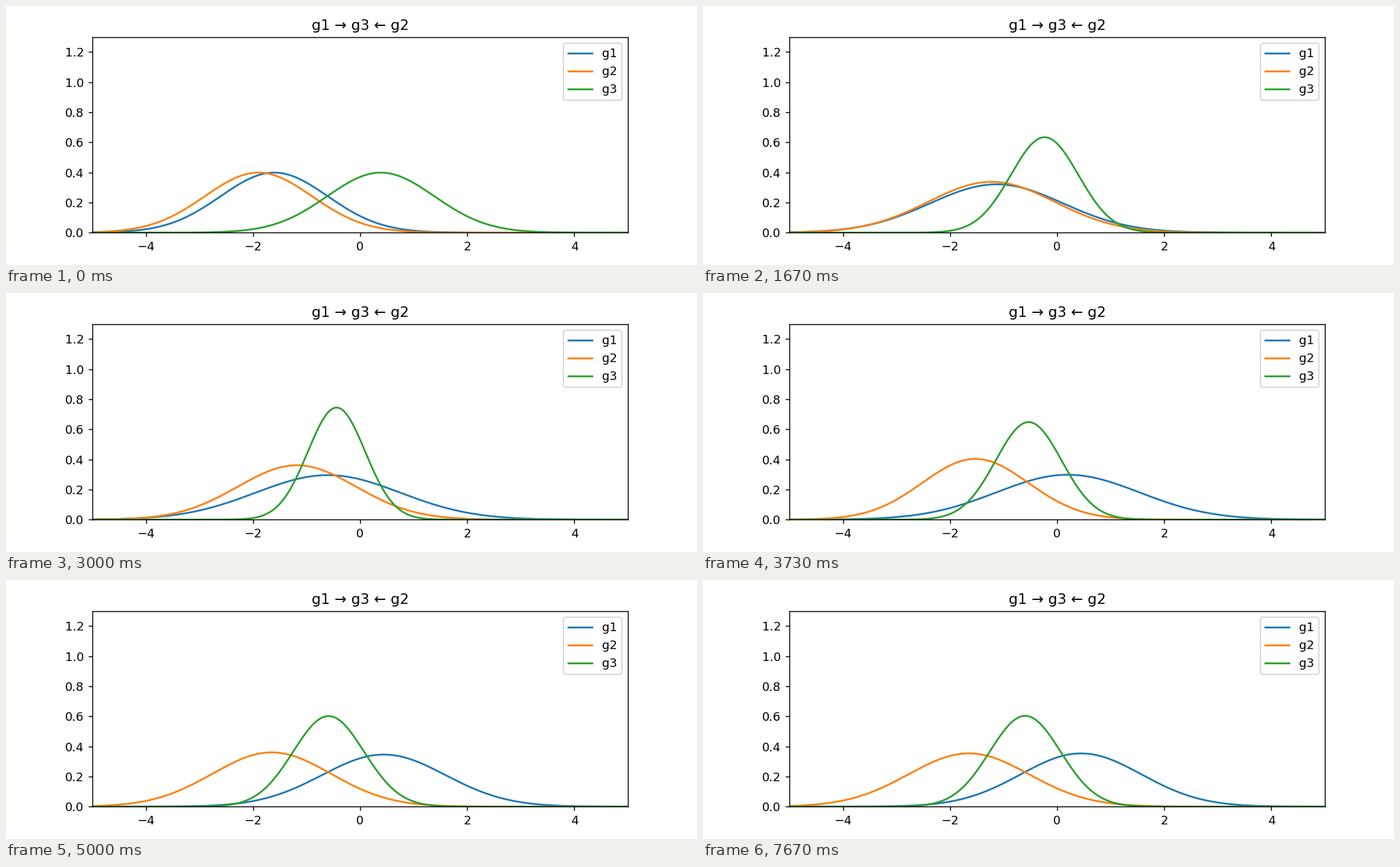
Animation, 1040 px wide and 390 px high, one loop 8 s. Source, as a matplotlib script:

```python
import numpy as np
import matplotlib.pyplot as plt
from matplotlib.animation import FuncAnimation

LOOP_MS, INTERVAL = 8000, 40
STEPS_PER_MS = 15 / 1000    # optimiser steps shown per millisecond
SETTLED = 96                # step at which the curves come to rest


def approach(t, size, tau):
    """Exponential approach from 0 to size."""
    return size * (1 - np.exp(-t / tau))


def shift(t, size, centre, width):
    """Smooth sigmoid change, 0 at t = 0."""
    def half(u):
        return np.tanh((u - centre) / (2 * width)) / 2
    return size * (half(t) - half(0))


def states(t):
    """Mean and sigma of g1, g2 and g3: the curves attract, then g1 and g2 part."""
    g1 = (-1.605 + approach(t, 0.55, 13.3) + shift(t, 1.502, 48.5, 4.5),
          1 + approach(t, 0.28, 13.3) + shift(t, 0.09, 36, 4)
          - shift(t, 0.243, 65.4, 4.6))
    g2 = (-1.9 + approach(t, 0.796, 13.3) - shift(t, 0.546, 52.4, 3.2),
          1 + approach(t, 0.2, 8.5) - shift(t, 0.39, 52.7, 7)
          + shift(t, 0.316, 66, 4.3))
    g3 = (0.385 - approach(t, 0.7, 13.3) - shift(t, 0.285, 44, 8.5),
          1 - shift(t, 0.84, 10, 13) + shift(t, 0.234, 51.2, 5.4))
    return g1, g2, g3


def gauss(x, mean, sigma):
    return np.exp(-((x - mean) / sigma) ** 2 / 2) / (sigma * np.sqrt(2 * np.pi))


x = np.linspace(-5, 5, 500)
fig, ax = plt.subplots(figsize=(8, 3), dpi=130)
fig.subplots_adjust(left=0.125, right=0.9, bottom=0.125, top=0.88)
lines = [ax.plot(x, 0 * x, label=name)[0] for name in ("g1", "g2", "g3")]
ax.set(xlim=(-5, 5), ylim=(0, 1.3), title="g1 → g3 ← g2",
       xticks=range(-4, 5, 2), yticks=np.arange(0, 1.3, 0.2))
ax.legend(loc="upper right")


def update(frame):
    step = min(round(frame * INTERVAL * STEPS_PER_MS), SETTLED)
    for line, (mean, sigma) in zip(lines, states(step)):
        line.set_ydata(gauss(x, mean, sigma))
    return lines


anim = FuncAnimation(fig, update, frames=LOOP_MS // INTERVAL, interval=INTERVAL,
                     repeat=True, repeat_delay=0)
plt.show()
```
